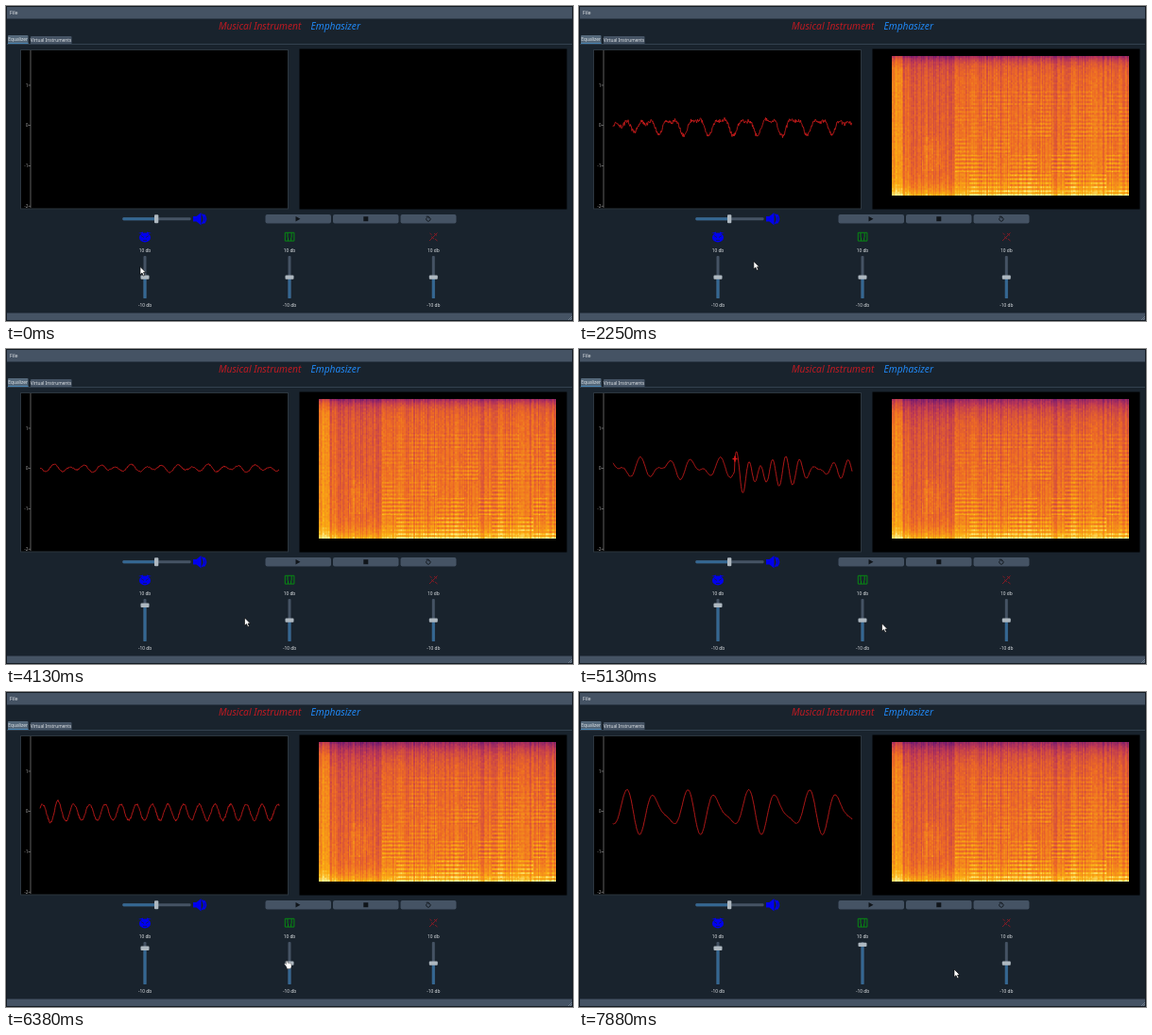
These frames come from a looping animation (600 by 334 pixels, 8000 ms). An HTML page with a canvas:

```html
<!DOCTYPE html>
<html lang="en">
<head>
<meta charset="utf-8">
<title>Equalizer</title>
<style>
html, body { margin: 0; width: 100%; height: 100%; overflow: hidden; background: #19232d; }
svg { position: absolute; left: 0; top: 0; }
canvas { position: absolute; left: 331px; top: 53px; }
text { font: 4.8px "Noto Sans", "Open Sans", sans-serif; fill: #dfe3e6; }
.title { font-size: 10.2px; font-style: italic; }
.axis text { fill: #999; text-anchor: end; }
.mid { text-anchor: middle; }
</style>
</head>
<body>
<svg id="stage" width="600" height="334" viewBox="0 0 600 334">
  <rect width="600" height="334" fill="#19232d"/>
  <rect width="600" height="13.5" fill="#455364"/>
  <text x="4" y="9.2" style="font-size:5.4px">File</text>
  <text class="title" x="225" y="25" style="fill:#bd1a22">Musical Instrument</text>
  <text class="title" x="322.5" y="25" style="fill:#2088f5">Emphasizer</text>
  <path d="M1 40.5H599" stroke="#33414f"/>
  <path d="M2 40V32q0-1 1-1H22.5q1 0 1 1V40z" fill="#54687a"/>
  <path d="M2 39.5H23.5" stroke="#4a86b4"/>
  <path d="M26 40V33q0-1 1-1H68.5q1 0 1 1V40z" fill="#455364"/>
  <text class="mid" x="12.7" y="37.3">Equalizer</text>
  <text class="mid" x="47.5" y="37.6">Virtual Instruments</text>

  <rect x="15.5" y="46.5" width="283" height="168.5" stroke="#2c363f"/>
  <rect x="310.5" y="45.5" width="283" height="170"/>
  <g class="axis">
    <path d="M26 47V214M23.5 84H26M23.5 126.5H26M23.5 169.5H26M23.5 212.3H26" stroke="#777" stroke-width=".8"/>
    <text x="23.5" y="85.8">1</text><text x="23.5" y="128.3">0</text>
    <text x="23.5" y="171.3">-1</text><text x="23.5" y="214.1">-2</text>
  </g>
  <path id="wave" fill="none" stroke="#d01d1d" stroke-width=".85" stroke-linejoin="round"/>
  <path id="spark" d="M162.5 116.5h5M165 113.5v6" stroke="#e01b1b" stroke-width="1.5"/>

  <rect x="123.5" y="224.3" width="72" height="3" rx="1" fill="#455364"/>
  <rect x="123.5" y="224.3" width="35" height="3" rx="1" fill="#346792"/>
  <rect x="157" y="221.3" width="4.3" height="9" rx="1" fill="#aeb8c0"/>
  <g fill="#00e">
    <path d="M198 223h3.5l5-4v13.5l-5-4H198z"/>
    <path d="M207.5 220.5q4 5.2 0 10.5M209.5 221q4 4.8 0 9.5" fill="none" stroke="#00e" stroke-width="1.5"/>
  </g>
  <g fill="#455364">
    <rect x="274.5" y="221" width="69.5" height="9.6" rx="2"/>
    <rect x="346" y="221" width="69.5" height="9.6" rx="2"/>
    <rect x="417.5" y="221" width="59" height="9.6" rx="2"/>
  </g>
  <path d="M306.5 223l5 2.8-5 2.8zM378.3 223.3h5v5h-5z" fill="#10151a"/>
  <path d="M445.5 224.3a2.2 2.2 0 1 0 2.8 0M444.7 223.2h2.6v2" fill="none" stroke="#10151a" stroke-width=".9"/>

  <g fill="#00e">
    <ellipse cx="147" cy="245.5" rx="6" ry="5"/>
    <path d="M140 241l5-1.5v2zM154 241l-5-1.5v2z"/>
    <path d="M143 243.5l3 2M151 243.5l-3 2M145 248.5h4" stroke="#19232d" stroke-width=".7"/>
  </g>
  <path d="M295.3 240.3h9.6v8.8h-9.6zM298.5 245.5v3.5M301.7 245.5v3.5M298 240.5v5M302.2 240.5v5" fill="none" stroke="#078a12"/>
  <path d="M448 249l8.5-8.5M453 241l3 2.5M448.5 241l2 1.5M454 247l2.5 2M450 244.5l3 2.5" fill="none" stroke="#8e1a24" stroke-width=".9"/>
  <g id="sliders"></g>

  <rect y="325.5" width="600" height="8.5" fill="#455364"/>
  <path d="M595 333l4-4M597 333l2-2" stroke="#8b98a5" stroke-width=".6"/>
  <rect x=".5" y=".5" width="599" height="333" fill="none" stroke="#141b23"/>
  <g id="cursor">
    <path id="arrow" d="M0 0V8.2L2 6.5 3.4 9.6 4.9 8.9 3.5 6H6z" fill="#fff" stroke="#000" stroke-width=".6"/>
    <path id="hand" d="M-1.5 6L-3.5 3.5q.5-1.5 2 0V.8q.8-1 1.5 0v1.5q1-.8 1.6.2 1-.6 1.5.4Q4 2.7 4 4v2.5L3 8.5H-.5z" fill="#fff" stroke="#222" stroke-width=".4"/>
  </g>
</svg>
<canvas id="spec" width="251" height="148"></canvas>
<script>
const $ = id => document.getElementById(id);
const STEP = 125, LOOP = 8000, LEFT = 36, RIGHT = 289, ZERO = 126.5;
const LOADED = 8, REBUILT = 36;
const clamp = v => Math.min(1, Math.max(0, v));
const mix = (a, b, p) => a + (b - a) * p;
const hash = (a, b = 0) => {
  const s = Math.sin(a * 127.1 + b * 311.7) * 43758.5453;
  return s - Math.floor(s);
};

// A tone of the given height and period with a crest at x = crest
const tone = (x, height, period, crest) => height * Math.cos(2 * Math.PI * (x - crest) / period);

function attack(x) {
  const decay = Math.exp((165 - x) / 60);
  return x < 165
    ? tone(x, 7, 28, 65) + tone(x, 5, 17, 65)
    : tone(x, 22 * decay, 13.2, 179.5) + tone(x, 7, 16.5, 235) - 8 * decay;
}

// Each sound: the step it is centred on, its roughness and its height above zero
const sounds = [
  { at: 11, noise: .8, height: () => 0 },
  { at: 24, noise: 4, height: x => tone(x, 5, 25.3, 62) + tone(x, 3.5, 13.1, 121) + tone(x, 3, 28.6, 61) },
  { at: 33, noise: 1.2, height: x => tone(x, 2.7, 16.3, 51) + tone(x, 1.6, 27, 132) },
  { at: 41, noise: .9, height: attack },
  { at: 51, noise: 2, height: x => tone(x, 8.5 + 4 * Math.exp(-(((x - 53) / 8) ** 2)), 16.6, 38.5) - 1 },
  { at: 63, noise: .7, height: x => tone(x, 17, 32.2, 49) + tone(x, 8, 21.5, 74) }
];

function drawWave(k) {
  if (k < LOADED) return $("wave").setAttribute("d", "");
  const sound = sounds.reduce((a, b) => Math.abs(b.at - k) < Math.abs(a.at - k) ? b : a);
  const span = RIGHT - LEFT, shift = Math.abs(k - sound.at) * 61;
  let d = "";
  for (let x = LEFT; x <= RIGHT; x += .5) {
    const u = (x - LEFT + shift) % (2 * span);
    const height = sound.height(LEFT + Math.min(u, 2 * span - u));
    const y = ZERO - height + (hash(x, k) - .5) * sound.noise;
    d += (d ? "L" : "M") + x + " " + y.toFixed(2);
  }
  $("wave").setAttribute("d", d);
}

// Black through purple, red and orange to pale yellow
const ramp = ["000004", "320a5e", "781c6d", "bc3754", "ed6925", "fbae12", "fcffa4"]
  .map(hex => hex.match(/../g).map(c => parseInt(c, 16)));
function heat(v) {
  const p = clamp(v) * 5.999, i = Math.floor(p);
  return ramp[i].map((c, j) => mix(c, ramp[i + 1][j], p - i));
}

function spectrogram(emphasis) {
  const { width, height, data } = new ImageData(251, 148);
  for (let x = 0; x < width; x++) {
    const note = Math.floor((x - 67) / 14.5);
    const streak = hash(x, 3) ** 2, wide = hash(Math.floor(x / 3), 8) - .5;
    for (let y = 0; y < height; y++) {
      const f = y / height, band = Math.floor(y / 17.5);
      const grain = hash(Math.floor(x / 2), Math.floor(y / 2)) - .5;
      let v = .68 + .07 * f - .1 * streak + .04 * wide + .05 * grain;
      v += .2 * Math.exp((f - 1) * 18) - .22 * Math.exp(-f * (emphasis ? 14 : 24));
      if (emphasis) v -= .02 * (1 - f);
      if (x < 11) v += .08 * (1 - f * .3);
      else if (x < 67) v -= mix(.02, .05, clamp((x - 11) / 30));
      else if (band > 1) v += (.02 + .08 * f) * hash(note, band) * (.3 + tone(y, 1, 4.2, 0));
      if (x > 31 && x < 52 && y > 85 && y < 122) v += .06 * hash(Math.floor(x / 3), Math.floor(y / 5));
      data.set([...heat(v), 255], (y * width + x) * 4);
    }
  }
  return new ImageData(data, width, height);
}
const pictures = [spectrogram(false), spectrogram(true)];

const centers = [147, 300, 452.3];
$("sliders").innerHTML = centers.map(x => `
  <text class="mid" x="${x}" y="261">10 db</text>
  <text class="mid" x="${x}" y="318.9">-10 db</text>
  <rect x="${x - 1.5}" y="265" width="3" height="45" rx="1" fill="#455364"/>
  <rect class="level" x="${x - 1.5}" width="3" fill="#346792"/>
  <rect class="knob" x="${x - 4.5}" width="9" height="4.3" rx="1" fill="#aeb8c0"/>`).join("");
const levels = document.querySelectorAll(".level"), knobs = document.querySelectorAll(".knob");

function setSlider(i, y) {
  levels[i].setAttribute("y", y);
  levels[i].setAttribute("height", 310 - y);
  knobs[i].setAttribute("y", y - 2.2);
}

// The pointer's stops; "drag" marks the stretch leading to the next one
const stops = [
  { at: 4, x: 142, y: 276.5 },
  { at: 11, x: 236.5, y: 252 },
  { at: 23, x: 148, y: 284, drag: true },
  { at: 24, x: 148, y: 284, drag: true },
  { at: 28, x: 148, y: 268 },
  { at: 33, x: 252.5, y: 285 },
  { at: 41, x: 320.5, y: 291 },
  { at: 50, x: 298, y: 285, drag: true },
  { at: 51, x: 298, y: 285, drag: true },
  { at: 56, x: 299, y: 265 },
  { at: 63, x: 397, y: 294 }
];

function drawCursor(k) {
  const i = Math.max(0, stops.findLastIndex(s => s.at <= k));
  const from = stops[i], to = stops[i + 1] || from;
  const p = clamp((k - from.at) / (to.at - from.at || 1));
  $("cursor").setAttribute("transform", `translate(${mix(from.x, to.x, p)} ${mix(from.y, to.y, p)})`);
  $("arrow").style.display = from.drag ? "none" : "";
  $("hand").style.display = from.drag ? "" : "none";
}

function draw(k) {
  drawWave(k);
  drawCursor(k);
  $("spark").style.display = k === 41 ? "" : "none";
  setSlider(0, mix(287.7, 271.8, clamp((k - 24) / 4)));
  setSlider(1, mix(287.7, 268, clamp((k - 51) / 5)));
  setSlider(2, 287.7);
  $("spec").style.display = k < LOADED ? "none" : "";
  $("spec").getContext("2d").putImageData(pictures[k < REBUILT ? 0 : 1], 0, 0);
}

let lastStep = -1;
const start = performance.now();
function tick() {
  const k = Math.floor((performance.now() - start) % LOOP / STEP);
  if (k !== lastStep) draw(lastStep = k);
  requestAnimationFrame(tick);
}
tick();
</script>
</body>
</html>
```
